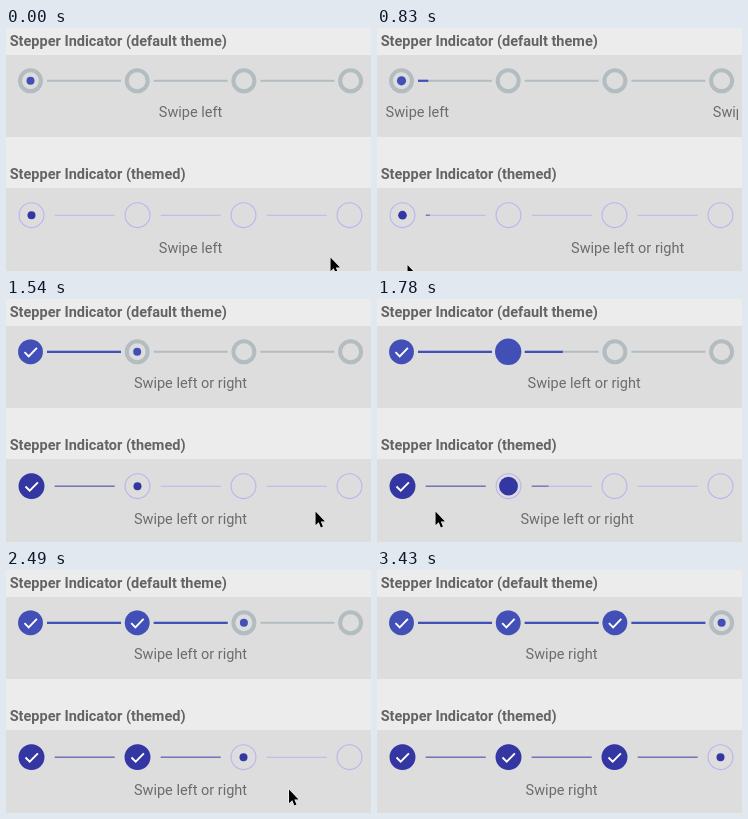
An HTML page for the animation above (4390 ms loop, 365 by 243 pixels).

```html
<!DOCTYPE html>
<html lang="en">
<head>
<meta charset="utf-8">
<title>Stepper Indicator</title>
<style>
html, body { margin: 0; width: 100%; height: 100%; overflow: hidden; background: #ececec; }
svg { display: block; width: 365px; height: 243px; }
text { font-family: Roboto, Arial, sans-serif; font-size: 14.5px; fill: #6c6c6c; }
.title { font-weight: 700; fill: #646464; }
</style>
</head>
<body>
<svg id="stage" viewBox="0 0 365 243">
  <defs><clipPath id="pager"><rect x="9" y="0" width="352" height="243"/></clipPath></defs>
  <rect width="365" height="243" fill="#ececec"/>
  <rect y="27" width="365" height="82" fill="#dddddd"/>
  <rect y="160" width="365" height="83" fill="#dddddd"/>
  <text class="title" x="3.7" y="18">Stepper Indicator (default theme)</text>
  <text class="title" x="3.7" y="151">Stepper Indicator (themed)</text>
</svg>
<script>
const LOOP = 4390, PAGE = 352;
const pages = ['Swipe left', 'Swipe left or right', 'Swipe left or right', 'Swipe right'];
const stage = document.getElementById('stage');

// Each swipe: drag start, release time, distance dragged at release.
const swipes = [[600, 812, 240], [1650, 1704, 110], [2490, 2635, 294]];

// Pointer tip at each tick, from the first tick of movement on.
const pointer = [
  [310, 233], [170, 238], [30, 236.5], [35, 230], [87, 215], [150, 213],
  [230, 213], [290, 213], [309, 212], [292, 215], [58, 212], [85, 208],
  [151, 205], [215, 208], [265, 214], [285, 217], [282.5, 219], [60, 225],
  [30, 232], [60, 230], [96.5, 228], [80, 231], [50, 235], [28, 239]
];
const shortTicks = [6, 12, 16, 21, 26];
const tickStart = k => 120 * k - 10 * shortTicks.filter(s => s < k).length;

const clamp = v => Math.max(0, Math.min(1, v));
const smooth = v => (1 - Math.cos(Math.PI * clamp(v))) / 2;
const decel = v => 1 - (1 - clamp(v)) ** 2;
const settle = v => 1 - (1 - clamp(v)) ** 5;

// Grows from a to peak, then relaxes to b.
function bounce(v, a, peak, b) {
  const f = smooth(v) * 2;
  return f < 1 ? a + (peak - a) * f : peak + (b - peak) * (f - 1);
}

function add(parent, tag, attrs) {
  const node = document.createElementNS('http://www.w3.org/2000/svg', tag);
  set(node, attrs);
  parent.appendChild(node);
  return node;
}
function set(node, attrs) {
  for (const key in attrs) node.setAttribute(key, attrs[key]);
}
const show = (node, on) => set(node, { visibility: on ? 'visible' : 'hidden' });

function makeStepper(o) {
  const row = add(stage, 'g', {});
  const steps = [], lines = [];
  for (let i = 0; i < 4; i++) {
    const x = o.x + i * o.gap;
    if (i < 3) {
      const x1 = o.lineX + i * o.gap;
      const line = { x1, y1: o.y, x2: x1 + o.len, y2: o.y };
      add(row, 'line', { ...line, stroke: o.idle, 'stroke-width': o.lineW });
      lines.push(add(row, 'line', { ...line, stroke: o.done, 'stroke-width': o.doneW }));
    }
    add(row, 'circle', {
      cx: x, cy: o.y, r: o.ring, fill: 'none', stroke: o.idle, 'stroke-width': o.ringW
    });
    steps.push({
      dot: add(row, 'circle', { cx: x, cy: o.y, fill: o.color }),
      tick: add(row, 'path', {
        d: `M${x - 6} ${o.y + .3}l4.2 4.2 8.2-8.4`,
        fill: 'none', stroke: '#fff', 'stroke-width': 1.9
      })
    });
  }
  const clip = add(stage, 'g', { 'clip-path': 'url(#pager)' });
  const labels = pages.map(label => {
    const node = add(clip, 'text', { y: o.textY, 'text-anchor': 'middle' });
    node.textContent = label;
    return node;
  });

  return function draw(t) {
    let scroll = 0;
    swipes.forEach(([from, release, drag], i) => {
      const pulled = o.dragged ? drag * clamp((t - from) / (release - from)) : 0;
      scroll += pulled + (PAGE - pulled) * settle((t - release) / 180);

      const age = t - release;
      const p = decel(age / o.lineTime);
      set(lines[i], { x2: o.lineX + i * o.gap + o.len * p });
      show(lines[i], p > 0);
    });
    labels.forEach((node, i) => set(node, { x: 184.5 + i * PAGE - scroll }));

    steps.forEach(({ dot, tick }, i) => {
      const left = i < 3 ? t - swipes[i][1] : -1;
      const came = i ? t - swipes[i - 1][1] - o.lineTime : 1000;
      const r = left > 0
        ? bounce(left / o.checkTime, 4, o.big * 1.3, o.big)
        : bounce(came / 200, 0, 5.6, 4);
      set(dot, { r });
      show(tick, left >= o.checkTime);
    });
  };
}

const steppers = [
  makeStepper({
    x: 24.5, gap: 106.7, y: 52.8, ring: 10.5, ringW: 4, big: 12.4,
    lineX: 41, len: 74, lineW: 2, doneW: 2.2,
    idle: '#b2bcc1', done: '#4350b7', color: '#414fb7',
    textY: 89, lineTime: 250, checkTime: 180, dragged: false
  }),
  makeStepper({
    x: 25.5, gap: 106, y: 187.2, ring: 12.4, ringW: 1.1, big: 12.9,
    lineX: 48.7, len: 60, lineW: 1.1, doneW: 1.4,
    idle: '#b8b4f0', done: '#7476b6', color: '#3437a2',
    textY: 224.5, lineTime: 500, checkTime: 250, dragged: true
  })
];

const arrow = add(stage, 'path', {
  d: 'M.5.5V14.2L3.7 11.3 5.9 16.4 8 15.5 5.8 10.5H10Z',
  fill: '#000', stroke: '#fff', 'stroke-width': 1, 'paint-order': 'stroke'
});

function render(time) {
  const t = time % LOOP;
  let k = 0;
  while (k < 29 && tickStart(k + 1) <= t) k++;
  steppers.forEach(draw => draw(tickStart(k)));

  const tip = k === 0 ? [324, 229] : k < 5 ? [326, 229] : pointer[k - 5];
  show(arrow, tip);
  if (tip) set(arrow, { transform: `translate(${tip})` });
}

const begin = performance.now();
function loop() {
  render(performance.now() - begin);
  requestAnimationFrame(loop);
}
loop();
</script>
</body>
</html>
```
